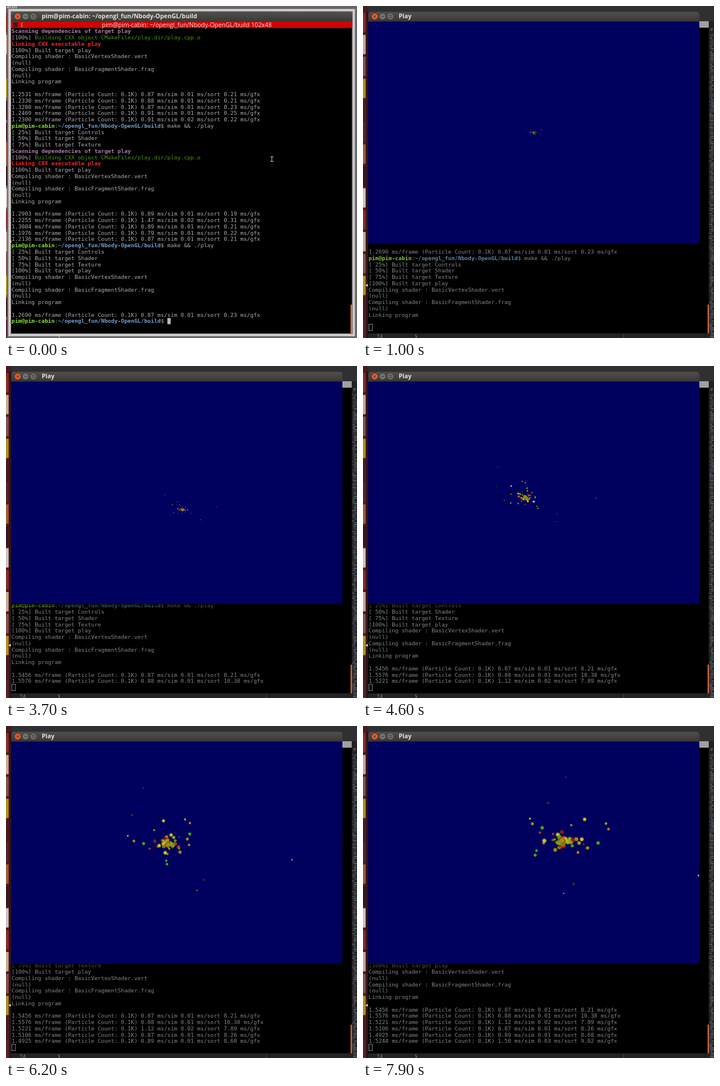
An HTML page with a canvas for the animation above (8 s loop, 600 px wide and 567 px high).

```html
<!DOCTYPE html>
<html lang="en">
<head>
<meta charset="utf-8">
<title>Play</title>
<style>
  html, body { margin: 0; width: 100%; height: 100%; overflow: hidden; background: #000; }
  canvas { display: block; width: 600px; height: 567px; }
</style>
</head>
<body>
<canvas id="stage" width="600" height="567"></canvas>
<script>
const ctx = document.getElementById('stage').getContext('2d');
const LOOP = 8000, STEP = 100;
const MONO = '"DejaVu Sans Mono", monospace';
const SANS = '"Open Sans", "Noto Sans", sans-serif';
const USER = 'pim@pim-cabin', DIR = '~/opengl_fun/Nbody-OpenGL/build';
const COL = 5.667, ROW = 10.76, LAST_ROW = 47;

function rng(seed) {
  return () => {
    seed = (seed * 1664525 + 1013904223) >>> 0;
    return seed / 4294967296;
  };
}
const lerp = (a, b, k) => a + (b - a) * k;

function rect(x, y, w, h, color) {
  ctx.fillStyle = color;
  ctx.fillRect(x, y, w, h);
}
function label(text, x, y, font, color, align = 'left') {
  ctx.font = font;
  ctx.textAlign = align;
  ctx.fillStyle = color;
  ctx.fillText(text, x, y);
}
function disc(x, y, r, fill) {
  ctx.fillStyle = fill;
  ctx.beginPath();
  ctx.arc(x, y, r, 0, Math.PI * 2);
  ctx.fill();
}

// ---- terminal log: each line has a start time and styled runs ----
const log = [];
const add = (at, ...runs) => log.push({ at, runs });
const plain = (at, ...lines) => lines.forEach(text => add(at, ['text', text]));
const stat = (at, frame, sim, sort, gfx) =>
  plain(at, `${frame} ms/frame (Particle Count: 0.1K) ${sim} ms/sim ${sort} ms/sort ${gfx} ms/gfx`);

function prompt(at, enteredAt) {
  add(at, ['user', USER], ['text', ':'], ['dir', DIR], ['text', '$ ']);
  log[log.length - 1].typed = enteredAt;
}
function targets(at) {
  plain(at, '[ 25%] Built target Controls', '[ 50%] Built target Shader', '[ 75%] Built target Texture');
}
function rebuild() {
  add(0, ['scan', 'Scanning dependencies of target play']);
  add(0, ['text', '[100%] '], ['build', 'Building CXX object CMakeFiles/play.dir/play.cpp.o']);
  add(0, ['link', 'Linking CXX executable play']);
}
function startup(builtAt, at) {
  plain(builtAt, '[100%] Built target play');
  plain(at, 'Compiling shader : BasicVertexShader.vert', '(null)',
    'Compiling shader : BasicFragmentShader.frag', '(null)', 'Linking program', '');
}

rebuild();
startup(0, 0);
stat(0, '1.2531', '0.87', '0.01', '0.21');
stat(0, '1.2330', '0.88', '0.01', '0.21');
stat(0, '1.3280', '0.87', '0.01', '0.23');
stat(0, '1.2469', '0.91', '0.01', '0.25');
stat(0, '1.2300', '0.91', '0.02', '0.22');
prompt(0, 0);
targets(0);
rebuild();
startup(0, 0);
stat(0, '1.2903', '0.89', '0.01', '0.19');
stat(0, '1.2255', '1.47', '0.02', '0.31');
stat(0, '1.3004', '0.89', '0.01', '0.21');
stat(0, '1.1976', '0.79', '0.01', '0.22');
stat(0, '1.2136', '0.87', '0.01', '0.21');
prompt(0, 0);
targets(0);
startup(0, 0);
stat(0, '1.2690', '0.87', '0.01', '0.23');
prompt(0, 300);
targets(600);
startup(600, 700);
stat(2000, '1.5456', '0.87', '0.01', '8.21');
stat(3100, '1.5576', '0.88', '0.01', '10.38');
stat(4100, '1.5221', '1.12', '0.02', '7.89');
stat(5100, '1.5106', '0.87', '0.01', '8.26');
stat(6100, '1.4925', '0.89', '0.01', '8.68');
stat(7100, '1.5244', '1.50', '0.03', '9.02');

const ACTIVE = { text: '#adadad', user: '#8ae234', dir: '#729fcf', scan: '#ad7fa8', build: '#4a9610', link: '#ef2929' };
const IDLE = { text: '#85858a', user: '#84c43c', dir: '#5f7f9f', scan: '#80607c', build: '#3a760e', link: '#b42222' };
const BOLD = ['user', 'dir', 'scan', 'link'];

function cells(text, col, y, style, colors) {
  ctx.font = (BOLD.includes(style) ? 'bold ' : '') + '9.41px ' + MONO;
  ctx.textAlign = 'left';
  ctx.fillStyle = colors[style];
  [...text].forEach((ch, i) => {
    if (ch !== ' ') ctx.fillText(ch, 9.5 + (col + i) * COL, y + 3.4);
  });
}

function terminal(t, idle) {
  const colors = idle ? IDLE : ACTIVE;
  const lines = log.filter(l => l.at <= t);
  const atPrompt = t < 600;
  const cursorRow = atPrompt ? lines.length - 1 : lines.length;
  const scroll = Math.max(0, cursorRow - LAST_ROW);
  rect(9, 26, 582, 533, '#000');
  let endCol = 0;
  lines.slice(scroll).forEach((line, i) => {
    endCol = 0;
    const runs = line.typed <= t ? [...line.runs, ['text', 'make && ./play']] : line.runs;
    for (const [style, text] of runs) {
      cells(text, endCol, 43 + i * ROW, style, colors);
      endCol += text.length;
    }
  });
  const x = 9.5 + (atPrompt ? endCol : 0) * COL;
  const y = 43 + (cursorRow - scroll) * ROW;
  if (idle) {
    ctx.strokeStyle = colors.text;
    ctx.lineWidth = 1;
    ctx.strokeRect(10, Math.round(y) - 5.5, 6, 11);
  } else {
    rect(x, y - 5, 5.7, 10.5, '#b8b8b8');
  }
  rect(589, 510, 2.5, 49, idle ? '#c8623c' : '#e0703e');
}

// ---- desktop and window frames ----
const TILES = ['#8a2a24', '#c8a890', '#84504c', '#b09014', '#4a1a1c', '#54242a', '#a05a38', '#3a1418', '#ccc4bc'];

function launcher(width) {
  for (let i = 0; i < 15; i++) rect(0, 12 + i * 37.4, width, 33, TILES[i % TILES.length]);
}

function desktop() {
  rect(0, 0, 600, 567, '#303032');
  rect(0, 0, 9, 567, '#4a1a22');
  launcher(4.5);
  rect(5.5, 10, 3.5, 557, '#2a1418');
  rect(591, 26, 9, 541, '#222225');
  const r = rng(7);
  for (let y = 48; y < 566; y += 3) {
    rect(592 + r() * 3, y, 3 + r() * 6, 1.6, ['#66666c', '#48484c', '#4a5c62'][Math.floor(r() * 3)]);
  }
  label('P', 594, 43, '7px ' + MONO, '#8c8c90');
  rect(9, 559, 583, 8, '#232326');
  rect(445, 560, 1, 7, '#44444a');
  label('74', 23, 567.5, '9px ' + MONO, '#808084');
  label('}', 88, 567.5, '9px ' + MONO, '#a8a8a8');
}

function brightDesktop() {
  rect(0, 0, 600, 567, '#6a6668');
  launcher(2);
  label('ator', 1, 4, 'bold 9px ' + SANS, '#d0ccc8');
  ctx.strokeStyle = '#cdcaca';
  ctx.lineWidth = 4;
  ctx.strokeRect(6, 7, 588.5, 555);
  label('}', 88, 567.5, '9px ' + MONO, '#d8d8d8');
}

function strokeLines(color, ...segments) {
  ctx.strokeStyle = color;
  ctx.lineWidth = 1;
  ctx.beginPath();
  for (const [x1, y1, x2, y2] of segments) {
    ctx.moveTo(x1, y1);
    ctx.lineTo(x2, y2);
  }
  ctx.stroke();
}

function titleBar(right, title) {
  const g = ctx.createLinearGradient(0, 10, 0, 26);
  g.addColorStop(0, '#504f4b');
  g.addColorStop(1, '#3a3936');
  ctx.fillStyle = g;
  ctx.beginPath();
  ctx.roundRect(9, 10, right - 9, 17, [5, 5, 0, 0]);
  ctx.fill();
  ['#ea5a2c', '#76746e', '#76746e'].forEach((c, i) => disc(20 + i * 13.4, 18, 5, c));
  strokeLines('#3a3834', [18, 16, 22, 20], [22, 16, 18, 20], [31, 18, 36, 18]);
  ctx.strokeRect(44.8, 16, 4, 4);
  label(title, 61, 21.4, 'bold 10.35px ' + SANS, '#e4e0d8');
}

function terminalFrame() {
  const title = `${USER}: ${DIR}`;
  titleBar(592, title);
  rect(9, 27, 583, 10.5, '#d00404');
  rect(12, 28, 8, 8, '#3c1a18');
  rect(26.5, 28, 1, 8, '#f0c0b8');
  label(title + ' 102x48', 309, 35.6, '10.4px ' + SANS, '#f4dcd8', 'center');
}

function marker(x, y) {
  ctx.fillStyle = '#e4dcc0';
  ctx.beginPath();
  ctx.moveTo(x - 2, y);
  ctx.lineTo(x + 2, y - 2.5);
  ctx.lineTo(x + 2, y + 2.5);
  ctx.fill();
}

const pointer = () => strokeLines('#cacaca',
  [452, 257.5, 457, 257.5], [454.5, 257.5, 454.5, 265.5], [452, 265.5, 457, 265.5]);

// ---- particles: a flat swarm with a dense core and a thin halo ----
const HUES = ['#3fae12', '#c87a14', '#a88a18', '#8e5c14', '#c4380f', '#1d3a14', '#d4c41e', '#80240e', '#8cb01c'];

// key moments of the flight: time, centre x, centre y, zoom
const CAMERA = [
  [1000, 292, 216, 0.07],
  [2000, 300, 217, 0.25],
  [3700, 302, 245, 0.25],
  [5500, 256, 206, 0.75],
  [6900, 298, 199, 1],
  [7900, 340, 196, 1]
];

const rand = rng(42);
const swarm = Array.from({ length: 85 }, (_, i) => {
  const u = (i + rand()) / 85;
  const dist = 13 * u / (1.05 - u);
  return {
    dist,
    angle: rand() * Math.PI * 2,
    spin: 0.0018 / (1 + dist / 20),
    size: (2.2 + rand() * 2.8) / (1 + dist / 160),
    hue: HUES[Math.floor(rand() * HUES.length)]
  };
}).sort((p, q) => q.dist - p.dist);

function ball(x, y, r, hue) {
  const g = ctx.createRadialGradient(x, y, 0, x, y, r);
  g.addColorStop(0.5, hue);
  g.addColorStop(1, hue + '00');
  disc(x, y, r, g);
}

function particles(t) {
  const next = CAMERA.findIndex(key => key[0] >= t);
  const a = CAMERA[Math.max(0, next - 1)], b = CAMERA[next];
  const k = a === b ? 0 : (t - a[0]) / (b[0] - a[0]);
  const [, cx, cy, zoom] = a.map((v, n) => lerp(v, b[n], k));
  ctx.save();
  ctx.beginPath();
  ctx.rect(9, 26, 566, 380);
  ctx.clip();
  for (const p of swarm) {
    const phi = p.angle + p.spin * t;
    const dx = p.dist * Math.cos(phi) * zoom;
    const dy = p.dist * Math.sin(phi) * 0.55 * zoom + dx * 0.1;
    ball(cx + dx, cy + dy, Math.max(0.8, p.size * zoom * 1.15), p.hue);
  }
  ctx.restore();
}

function playWindow(t) {
  const shade = ctx.createLinearGradient(0, 406, 0, 417);
  shade.addColorStop(0, 'rgba(0,0,0,.65)');
  shade.addColorStop(1, 'rgba(0,0,0,0)');
  rect(9, 406, 572, 11, shade);
  titleBar(575, 'Play');
  rect(9, 26.5, 566, 379.5, '#00005f');
  if (t >= 1000) particles(t);
}

function draw(t) {
  const idle = t >= 800;
  if (idle) desktop(); else brightDesktop();
  terminal(t, idle);
  if (idle) {
    rect(575, 26, 16, 11, '#a0a0a0');
    ctx.globalAlpha = Math.min(1, (t - 700) / 300);
    playWindow(t);
    ctx.globalAlpha = 1;
    marker(6, 477);
  } else {
    terminalFrame();
    marker(7, 402);
    pointer();
  }
}

let shown = -1;
const start = performance.now();
function tick() {
  const t = Math.floor(((performance.now() - start) % LOOP) / STEP) * STEP;
  if (t !== shown) draw(shown = t);
  requestAnimationFrame(tick);
}
tick();
</script>
</body>
</html>
```
